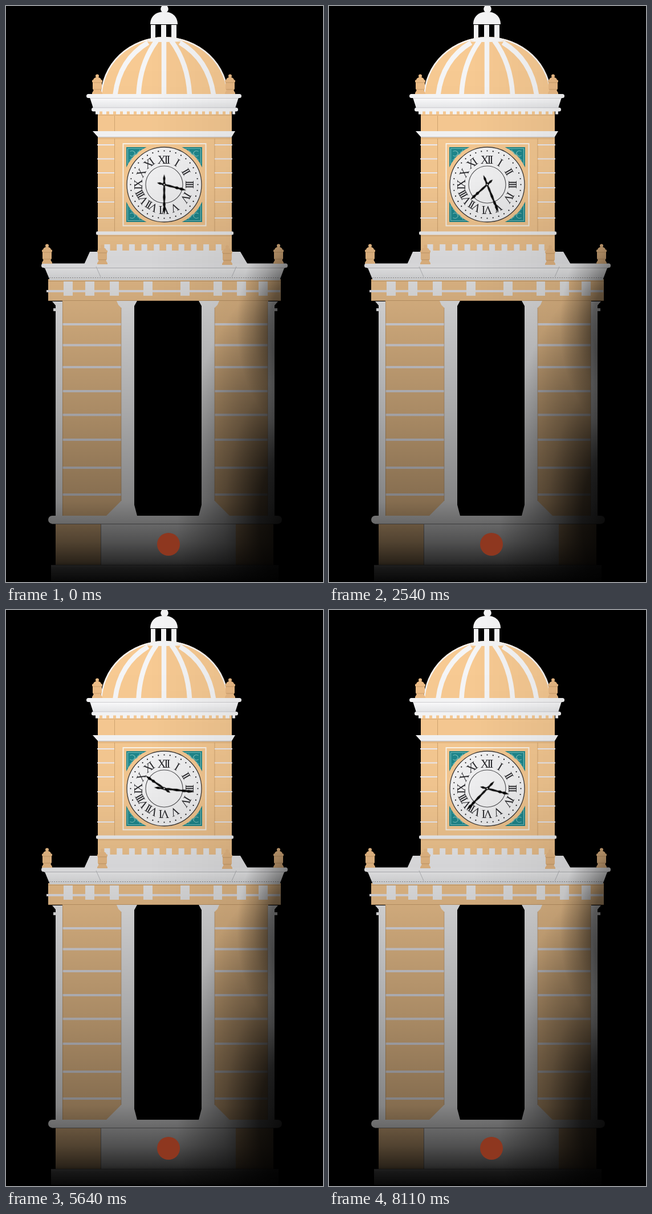
Animation, 556 px wide and 1008 px high, one loop 8150 ms. Source, as an HTML page without scripts:

```html
<!DOCTYPE html>
<html lang="en">
<head>
<meta charset="utf-8">
<title>Clock tower</title>
<style>
html, body { margin: 0; width: 100%; height: 100%; overflow: hidden; background: #000; }
svg { display: block; width: 100%; height: 100%; }
.o { fill: #f7ca93; }
.w { fill: #f5f5f6; }
.seam { fill: none; stroke: #a97c4c; stroke-opacity: .45; stroke-width: 1; }
.line { fill: none; stroke: #eeedf3; stroke-width: 4; }
.thin { stroke-width: 2.2; }
.rib { fill: none; stroke: #f5f5f6; stroke-width: 8.5; }
.num { font: 20.5px "Liberation Serif", "Noto Serif", serif; letter-spacing: -3px; text-anchor: middle; fill: #2a2a2e; }
.hand { fill: #050505; animation: 4075ms -12ms infinite; }
.hour { animation-name: hour; }
.minute { animation-name: minute; }

/* Both hands run backwards, rest briefly, then run on at 30 pictures a second. */
@keyframes hour {
  0% { transform: rotate(104.5deg); animation-timing-function: steps(17); }
  13.934% { transform: rotate(35.7deg); animation-timing-function: steps(13); }
  24.59% { transform: rotate(-20deg); animation-timing-function: steps(4); }
  27.869% { transform: rotate(-20deg); animation-timing-function: steps(1); }
  28.689% { transform: rotate(-24deg); animation-timing-function: steps(41); }
  62.295% { transform: rotate(-132deg); animation-timing-function: steps(38); }
  93.443% { transform: rotate(-238.3deg); animation-timing-function: steps(7); }
  99.18%, 100% { transform: rotate(-255.5deg); }
}
@keyframes minute {
  0% { transform: rotate(180deg); animation-timing-function: steps(30); }
  24.59% { transform: rotate(-882deg); animation-timing-function: steps(4); }
  27.869% { transform: rotate(-882deg); animation-timing-function: steps(1); }
  28.689% { transform: rotate(-922deg); animation-timing-function: steps(41); }
  62.295% { transform: rotate(-2362deg); animation-timing-function: steps(38); }
  93.443% { transform: rotate(-3852deg); animation-timing-function: steps(7); }
  99.18% { transform: rotate(-4096deg); animation-timing-function: steps(1); }
  100% { transform: rotate(-4140deg); }
}
</style>
</head>
<body>
<svg viewBox="0 0 556 1008" preserveAspectRatio="none">
<defs>
  <linearGradient id="dusk" x1="0" y1="0" x2="0" y2="1">
    <stop offset=".1" stop-opacity="0"/>
    <stop offset=".3" stop-opacity=".03"/>
    <stop offset=".48" stop-opacity=".14"/>
    <stop offset=".7" stop-opacity=".31"/>
    <stop offset=".86" stop-opacity=".46"/>
    <stop offset=".93" stop-opacity=".67"/>
    <stop offset=".965" stop-opacity=".82"/>
    <stop offset=".975" stop-opacity=".9"/>
    <stop offset="1" stop-opacity=".97"/>
  </linearGradient>
  <linearGradient id="side">
    <stop offset=".45" stop-opacity="0"/>
    <stop offset=".75" stop-opacity=".06"/>
  </linearGradient>
  <radialGradient id="night" gradientUnits="userSpaceOnUse" cx="0" cy="0" r="1" gradientTransform="translate(505 900) scale(205 430)">
    <stop offset="0" stop-opacity=".94"/>
    <stop offset=".3" stop-opacity=".78"/>
    <stop offset=".6" stop-opacity=".36"/>
    <stop offset="1" stop-opacity="0"/>
  </radialGradient>
  <radialGradient id="shade" gradientUnits="userSpaceOnUse" cx="0" cy="0" r="1" gradientTransform="translate(520 560) scale(115 190)">
    <stop offset="0" stop-opacity=".65"/>
    <stop offset=".5" stop-opacity=".48"/>
    <stop offset=".75" stop-opacity=".2"/>
    <stop offset="1" stop-opacity="0"/>
  </radialGradient>
  <linearGradient id="white" x1="0" y1="0" x2="0" y2="1">
    <stop offset="0" stop-color="#fcfcfd"/>
    <stop offset="1" stop-color="#e6e7e9"/>
  </linearGradient>
  <clipPath id="domeClip"><path d="M160 50H396V155H160Z"/></clipPath>
  <g id="urn">
    <circle cy="-30.500" r="3"/>
    <path d="M-7-23C-7-30 7-30 7-23Z"/>
    <rect x="-9" y="-23.500" width="18" height="4" rx="1"/>
    <path d="M-8-20H8V-8L6-5H-6L-8-8Z"/>
    <path d="M-6-6H6L9-1V1H-9V-1Z"/>
    <path class="seam" d="M-8-19H8M-7-7H7"/>
  </g>
  <g id="corner">
    <path fill="#1f898e" d="M-66.500-65.500H-31A72 72 0 0 0-66.500-30Z"/>
    <path fill="none" stroke="#79bfbc" stroke-width="1.200" d="M-64-36V-63H-37M-60-58q6-3 9 3q-3 8-9 4M-51-52q4-1 5-5M-61-43q4 0 4-4M-43-61q0 4-4 4"/>
  </g>
  <g id="courses">
    <path class="line" d="M0 557H103M0 593.500H103M0 632H103M0 674H103M0 715.500H103M0 759H103M0 808H103M0 855H103"/>
  </g>
</defs>

<rect width="556" height="1008"/>

<!-- lantern and dome -->
<g class="w">
  <circle cx="278" cy="5" r="6.800"/>
  <path d="M253 32C253 17 264 10 277 10S301 17 301 32Z"/>
  <path d="M254 33H262V57H254ZM272 33H281V57H272ZM290 33H299V57H290Z"/>
</g>
<g clip-path="url(#domeClip)">
  <ellipse cx="278" cy="160" rx="112" ry="106" class="o"/>
  <ellipse cx="278" cy="160" rx="110.800" ry="104.800" fill="none" stroke="#f5f5f6" stroke-width="2.400"/>
  <path class="rib" d="M277 56V155M264 61Q235 100 232.500 155M290 61Q319 100 322 155M249 64Q199 94 191.500 155M305 64Q355 94 364 155"/>
  <path class="w" d="M246 62Q278 48 310 62Q294 63 278 63T246 62Z"/>
</g>
<g fill="#edbd87">
  <use href="#urn" x="160" y="153"/>
  <use href="#urn" x="393" y="153"/>
</g>

<!-- upper cornice -->
<path class="o" d="M161 180H396V430H161Z"/>
<path fill="url(#white)" d="M147 160H408L402 179H153Z"/>
<rect x="141" y="154" width="272" height="7" rx="3.500" class="w"/>
<rect x="150" y="178" width="257" height="6.500" rx="3" class="w"/>
<path fill="none" stroke="#c4c3c8" d="M147 161.500H408M152 178H404" stroke-width=".8"/>
<path fill="none" stroke="#f5f5f6" stroke-width="6" stroke-dasharray="7 5" d="M157 186.500H402"/>
<path class="seam" d="M161 191H396M190.500 192V219M190.500 232V395M366 232V395M161 232H396M161 402H396"/>
<path class="w" d="M152 219H402L396 229H161Z"/>
<path fill="none" stroke="#b9b6b8" d="M161 229.500H396"/>
<path class="line thin" d="M160 243H190M160 267.500H190M160 292H190M160 318H190M160 343H190M160 371H190M366 243H397M366 267.500H397M366 292H397M366 318H397M366 343H397M366 371H397"/>
<rect x="158" y="394.500" width="241" height="6" rx="2" class="w"/>

<!-- clock -->
<rect x="205.500" y="241" width="145" height="143.500" fill="none" stroke="#fbf5ea" stroke-width="2"/>
<g transform="translate(277.500 312.500)">
  <use href="#corner"/>
  <use href="#corner" transform="scale(-1 1)"/>
  <use href="#corner" transform="scale(1 -1)"/>
  <use href="#corner" transform="scale(-1)"/>
  <circle r="65.500" fill="#f5f5f6" stroke="#3c3a3a" stroke-width="1.300"/>
  <circle r="32.500" fill="none" stroke="#4b4b4e" stroke-width="1.100"/>
  <circle r="59" fill="none" stroke="#1b1b1e" stroke-width="2.200" stroke-linecap="round" pathLength="36" stroke-dasharray="0 1"/>
  <g class="num" transform="translate(-.5 0)">
    <text x="-1.500" y="-37">XII</text>
    <text x="-1.500" y="-38" transform="rotate(31)">I</text>
    <text x="-1.500" y="-38" transform="rotate(60)">II</text>
    <text x="-1.500" y="-38" transform="rotate(90)">III</text>
    <text x="-1.500" y="-38" transform="rotate(121)">IV</text>
    <text x="-1.500" y="-38" transform="rotate(155)">V</text>
    <text x="-1.500" y="-37" transform="rotate(180)">VI</text>
    <text x="-1.500" y="-37" transform="rotate(210)">VII</text>
    <text x="-1.500" y="-38" transform="rotate(241)">VIII</text>
    <text x="-1.500" y="-38" transform="rotate(270)">IX</text>
    <text x="-1.500" y="-38" transform="rotate(297)">X</text>
    <text x="-1.500" y="-39" transform="rotate(325)">XI</text>
  </g>
  <path class="hand hour" d="M0-40L1.300-35L2.500-31L1.200-27L2.500-23L1.200-19L1.800-10L1.300-3L2.300 0L1.300 4L2 8L0 13L-2 8L-1.300 4L-2.300 0L-1.300-3L-1.800-10L-1.200-19L-2.500-23L-1.200-27L-2.500-31L-1.300-35Z"/>
  <path class="hand minute" d="M0-53L1.200-48L2.400-43L1.200-39L2.400-35L1.200-30L2.200-22L1.400-15L1.800-8L1.200-3L2.300 0L1.300 6L2 11L0 18L-2 11L-1.300 6L-2.300 0L-1.200-3L-1.800-8L-1.400-15L-2.200-22L-1.200-30L-2.400-35L-1.200-39L-2.400-43L-1.200-48Z"/>
  <circle r="1.300" fill="#eee"/>
</g>

<!-- balcony -->
<path fill="#f1f1f3" d="M147 430H161V428H396V430H411L424 452H137Z"/>
<path fill="none" stroke="#f1f1f3" stroke-width="12" stroke-dasharray="10 11.700" d="M172.500 423H380"/>
<path class="o" d="M74 478H482V516H74Z"/>
<path fill="url(#white)" d="M67 456H489L480 480H77Z"/>
<rect x="62" y="450.500" width="432" height="7.500" rx="3.500" fill="#f4f4f6"/>
<path fill="none" stroke="#bfc0c4" d="M67 458.500H489M158 456L166 474M404 456L396 474"/>
<path fill="none" stroke="#9a9a9d" stroke-width="1.200" stroke-dasharray="2 2" d="M76 475.500H481"/>
<path class="seam" d="M74 481.500H482M74 515.500H482"/>
<path class="line" d="M71 499H481"/>
<path class="w" d="M101 482h16v25h-16zM139 482h16v25h-16zM182 482h16v25h-16zM241 482h16v25h-16zM306 482h16v25h-16zM364 482h15v25h-15zM405 482h16v25h-16zM443 482h16v25h-16z"/>
<g fill="#f2c28b">
  <use href="#urn" x="72" y="450"/>
  <use href="#urn" x="478" y="450"/>
  <use href="#urn" x="169" y="451"/>
  <use href="#urn" x="388" y="452"/>
</g>

<!-- legs -->
<path class="o" d="M99 516H203V892H99ZM366 516H460V892H366Z"/>
<use href="#courses" x="99"/>
<svg x="366" y="0" width="94" height="1008"><use href="#courses"/></svg>
<g class="w">
  <path d="M81 517H99V892H87V534H83V529H87V524Z"/>
  <path d="M477 517H459V892H471V534H476V529H471V524Z"/>
  <path d="M194 516H230L225 525V873L230 892H176L202 866V528L197 523Z"/>
  <path d="M374 516H338L343 525V873L338 892H392L366 866V528L371 523Z"/>
</g>
<path class="seam" d="M99.500 517V892M202 528V866M366 528V866M459 517V892"/>

<!-- plinth -->
<path class="o" d="M87 905H166V979H87ZM403 905H469V979H403Z"/>
<path class="w" d="M166 905H403V979H166ZM79 978H478V1006H79Z"/>
<rect x="74" y="892" width="410" height="14" rx="7" class="w"/>
<path fill="none" stroke="#77777a" d="M80 906.500H478M166.500 907V978M79 978.500H478" stroke-width=".8"/>

<!-- falling light -->
<rect width="556" height="1008" fill="url(#side)"/>
<rect width="556" height="1008" fill="url(#dusk)"/>
<rect width="556" height="1008" fill="url(#night)"/>
<rect width="556" height="1008" fill="url(#shade)"/>
<circle cx="285" cy="942" r="20" fill="#8e371f"/>
</svg>
</body>
</html>
```
